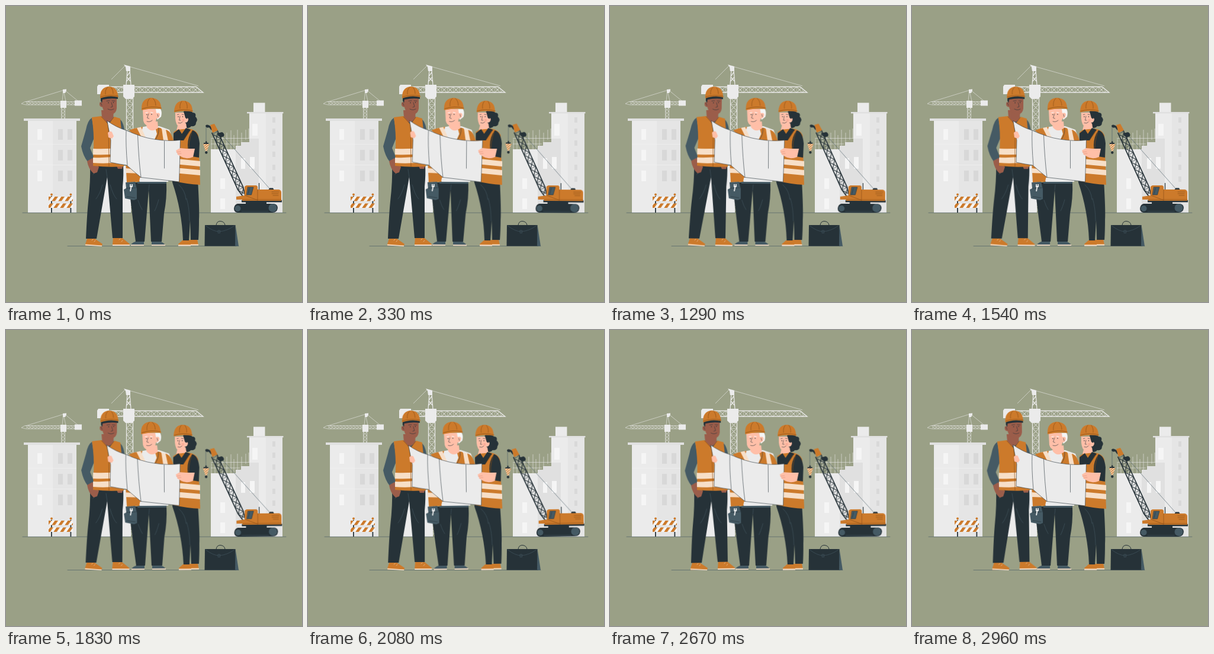
These frames come from a looping animation (500 px wide and 500 px high, 3 s). An HTML page:

```html
<!DOCTYPE html>
<html lang="en">
<head>
<meta charset="utf-8">
<title>Builders on site</title>
<style>
html, body { margin: 0; width: 100%; height: 100%; overflow: hidden; background: #9aa086; }
svg { display: block; width: 100vw; height: 100vh; }
.o { fill: #cc7a2b; } .d { fill: #263238; } .b { fill: #455a64; }
.w { fill: #ebebeb; } .g { fill: #e0e0e0; } .l { fill: #f5f5f5; }
.p { fill: #f7dfc8; } .s { fill: #ffbfa8; } .k { fill: #9b5d4a; }
.ln { fill: none; stroke: #263238; stroke-width: .6; stroke-linecap: round; stroke-linejoin: round; }
.sh { fill: none; stroke: #8a4f18; stroke-width: .7; stroke-linecap: round; }
.wl { fill: none; stroke: #e8e8e6; stroke-width: .6; }
.gl { fill: none; stroke: #455a64; stroke-width: .6; stroke-linecap: round; }

.sway { animation: sway 3s linear infinite; }
.late { animation: late 3s linear infinite; }
.tall { transform-origin: 168px 271px; }
.mid { transform-origin: 236px 280px; }
.lady { transform-origin: 304px 282px; }
.digger { transform-origin: 401px 274px; }
@keyframes sway { 25% { transform: rotate(1deg); } 75% { transform: rotate(-1deg); } }
@keyframes late {
  0%, 16.667% { transform: rotate(0deg); }
  41.667% { transform: rotate(1deg); }
  91.667% { transform: rotate(-1deg); }
  100% { transform: rotate(-.667deg); }
}
</style>
</head>
<body>
<svg viewBox="0 0 500 500" xmlns="http://www.w3.org/2000/svg">
<defs>
  <pattern id="jib" width="10" height="10" x="165" y="136.500" patternUnits="userSpaceOnUse">
    <path d="M0 0L10 10M0 10L10 0M0 0V10" fill="none" stroke="#e8e8e6" stroke-width=".9"/>
  </pattern>
  <pattern id="mast" width="11" height="11" x="203.500" y="155" patternUnits="userSpaceOnUse">
    <path d="M0 0L11 11M0 11L11 0M0 0H11" fill="none" stroke="#e8e8e6" stroke-width="1"/>
  </pattern>
  <pattern id="mini" width="5.500" height="5.500" x="93.500" y="161.500" patternUnits="userSpaceOnUse">
    <path d="M0 0L5.500 5.500M0 5.500L5.500 0M0 0V5.500" fill="none" stroke="#e8e8e6" stroke-width=".6"/>
  </pattern>
  <pattern id="boom" width="13" height="10" y="-5" patternUnits="userSpaceOnUse">
    <path d="M0 0L13 10M0 10L13 0M0 0V10" fill="none" stroke="#263238" stroke-width="1.300"/>
  </pattern>
  <pattern id="tape" width="11" height="8" patternUnits="userSpaceOnUse" patternTransform="skewX(-35)">
    <path class="l" d="M0 0H11V8H0Z"/><path class="o" d="M0 0H5.500V8H0Z"/>
  </pattern>
  <pattern id="cone" width="3" height="3" patternUnits="userSpaceOnUse" patternTransform="rotate(-40)">
    <path class="p" d="M0 0H3V3H0Z"/><path class="o" d="M0 0H3V1.400H0Z"/>
  </pattern>
  <g id="panes"><path d="M0 0h8v18h-8zM0 35h8v18h-8zM0 70h8v18h-8z"/></g>
</defs>
<rect width="500" height="500" fill="#9aa086"/>

<!-- small tower crane -->
<path fill="url(#mini)" d="M93.500 172H99.500V191H93.500ZM34 161.500H118V167H34Z"/>
<path class="wl" d="M93.500 172V191M99.500 172V191M118 161.500H32L26 165L34 167H118M98 142L33 162M99 142L121 160M95 161L97 142L101 161"/>
<path class="w" d="M92 160H102V172H92ZM116 159.500H128V168.500H116ZM96 141L102 140.500V143L100 147H96Z"/>

<!-- left block -->
<path class="w" d="M37 194H119V349H37Z"/>
<path class="g" d="M30 190H125V194H30Z"/>
<path fill="#e5e5e5" d="M79 194H119V349H79Z"/>
<path d="M37 233.500H119M37 268.500H119" stroke="#f1f1f1" stroke-width=".7"/>
<use href="#panes" class="l" x="53" y="208"/>
<use href="#panes" fill="#d8d8d8" x="88" y="208"/>
<use href="#panes" fill="#d8d8d8" x="104" y="208"/>

<!-- large tower crane -->
<path fill="url(#mast)" d="M203.500 155H214.500V349H203.500Z"/>
<path fill="url(#jib)" d="M165 136.500H322L333 146.500H165Z"/>
<path class="wl" style="stroke-width:1.300" d="M203.500 155V349M214.500 155V349M165 136.500H321L333 146H165M203 134L205 108M211 134L209 108M203 128L210 120M211 128L204 120M204 119L209 112"/>
<path class="wl" d="M207 102L325 135M201 101L178 124"/>
<path class="w" d="M198 133H217V153L213 157H202L198 153ZM156 133H174V138L171 149H154V136ZM199 99L210 102V110H203L202 103Z"/>
<path class="w" d="M160 270H211V349H160Z"/>

<!-- right blocks -->
<path class="wl" d="M347 225V243M353 219V243M359 213V243M366 222V243M373 214V243M380 210V243M385 218V243M391 209V237M398 214V231M405 209V226M410 207V224M346 223.500H411M346 233H395"/>
<path class="g" d="M346 242H388V236H397V230H411V224H427V349H346Z"/>
<path class="w" d="M346 242H388V349H346ZM411 180H467V349H427V224H411ZM418 163.500H437.500V181H418Z"/>
<path fill="#e5e5e5" d="M439 181H467V349H439Z"/>
<path class="g" d="M407 179H468.500V181.500H407Z"/>
<path class="l" d="M397 257h7v18h-7zM412 255h8v20h-8zM362 291h8v18h-8zM362 325h8v18h-8zM416 199h9v20h-9z"/>
<path fill="#d9d9d9" d="M450 188h5v9h-5zM450 207h5v9h-5zM450 227h5v9h-5zM450 246h5v9h-5zM450 268h5v9h-5zM450 288h5v9h-5z"/>

<path class="gl" d="M28 349.300H473M104 405.500H393"/>

<!-- barricade -->
<path class="d" d="M76 321h1.800v28h-1.800zM108.500 321h1.800v28h-1.800z"/>
<circle class="o" cx="77" cy="318.500" r="1.900"/><circle class="o" cx="109.400" cy="318.500" r="1.900"/>
<path fill="url(#tape)" d="M72 322H113V329.500H72ZM72 333.500H113V341H72Z"/>

<!-- crawler crane -->
<g class="sway digger">
  <path class="gl" d="M364 217L444 307M338 203V230"/>
  <path d="M427.500 299V311" stroke="#263238" stroke-width="1.200"/>
  <g transform="translate(402 321) rotate(-114.500)">
    <path fill="url(#boom)" d="M4 -4L14 -5H112L120 -3V3L112 5H14L4 4Z"/>
    <path d="M0 -2L14 -5H120M0 2L14 5H120" fill="none" stroke="#263238" stroke-width="1.700"/>
  </g>
  <path class="d" d="M337 202Q339 199 344 202L349 206L347 210L343 205Q338 207 337 202ZM357 215L365 213Q370 216 368 220L363 222L358 219Z"/>
  <path class="o" d="M345 201L352 199L358 210L349 214Z"/>
  <path class="d" d="M334 231H342V233H334ZM337 228.500H339.400V232H337Z"/>
  <path fill="url(#cone)" d="M333 233H343.500L339.500 245H337Z"/>
  <circle class="d" cx="338.300" cy="247.500" r="2.200"/>
  <path class="d" d="M391 334H452Q459 335 459 341Q458 349 450 349H391Q385 348 385 342Q386 335 391 334ZM398 328H466V331.500H440V335H405V331.500H398ZM443 311L445 307.500H451L453 311Z"/>
  <circle class="b" cx="391.500" cy="342" r="5"/><circle class="b" cx="450.500" cy="341" r="7"/>
  <path class="gl" d="M398 347H443"/>
  <path class="o" d="M389 322L403 320V305L406 303H423L425 305V310H461Q465 311 465 315V329H399V327H389Z"/>
  <path class="b" d="M408.500 306H418L414.500 319H406.500Z"/>
  <path class="ln" d="M408.500 306H418L414.500 319H406.500ZM411 308L409 317"/>
  <path class="sh" d="M425 310V328M404 320L425 328M449 314H461M449 317H460M451 320H460M399 327H465"/>
</g>

<!-- briefcase -->
<path class="d" d="M336 370H387.500L389 405.500H335.500Z"/>
<path class="b" d="M387.500 369.500L393 405.500H387Z"/>
<path class="ln" d="M355 370Q356 363.500 362 363.500Q369 364 370 370" style="stroke-width:1"/>
<path class="gl" d="M337 371Q350 381 360 381Q374 380 386 371M358.500 379H361.500V383.500H358.500Z"/>

<!-- woman -->
<g class="sway lady">
  <path class="d" d="M301 176Q312 173 315 180Q322 180 320 187Q325 191 321 197Q321 204 313 203Q309 208 303 205L299 190Z"/>
  <path class="o" d="M291 402L299 395H311V405H291ZM311 396L312 394H323L325 404H311Z"/>
  <path class="p" d="M291 403.300H312V405.400H291ZM312 402.500H325V404.500H312Z"/>
  <path class="d" d="M281 294H324Q327 345 326 361Q326 380 325 395H312L311 362L309 396H299Q297 345 281 298Z"/>
  <path class="gl" d="M305 325Q310 342 310 363M292 302Q303 312 304 327"/>
  <path class="s" d="M291 198H304L306 210L296 220L288 210Z"/>
  <path class="o" d="M283 213L289 209L309 207Q321 209 325 218L328 302Q305 301 281 295Z"/>
  <path class="d" d="M283 215L292 208L297 216L304 206L312 209L300 227H283ZM315 210Q325 212 327 232L326 256L308 253L307 235Q307 221 315 210Z"/>
  <path class="p" d="M288 258L328 262V271L285 267ZM285 273L328 277V286L284 282Z"/>
  <path class="sh" d="M300 227L310 211M309 253Q307 230 314 212"/>
  <path class="s" d="M286 180H303Q306 181 305 190Q308 188 308 192Q307 197 303 197Q300 205 293 204Q287 202 286 190Z"/>
  <path class="d" d="M300 178H307L306 191L303 189Z"/>
  <path class="o" d="M284 178Q285 160 300 160Q314 161 315 176L316 179Q301 176 284 179.500Z"/>
  <path class="sh" d="M285 177.500Q300 173 315 177M294 173Q293 165 297 161M306 173Q307 166 303 161"/>
  <circle class="d" cx="291" cy="187" r=".8"/><circle class="d" cx="298.500" cy="187" r=".8"/>
  <path class="ln" d="M289.500 183.500L292 183M297 183L300 183.500M294 186L292.500 193H295M291 197.500Q295 199.500 298 196"/>
  <circle cx="299.500" cy="193" r="2.200" fill="#f49a88" opacity=".5"/>
</g>

<!-- tall man -->
<g class="late tall">
  <path class="o" d="M134 402L137 393H150L163 402L162 405H134ZM180 402L181 391.500H196L209 402L208 405H180Z"/>
  <path class="p" d="M134 402.500L162 404.500V406L134 404.500ZM180 403H209V405H180Z"/>
  <path class="ln" style="stroke:#f7dfc8" d="M147 394L145 396M151 396L149 398M193 393L191 395M197 396L195 398"/>
  <path class="d" d="M142 268H198Q199 285 197 305L197 392H180L171 289L153 393H135Q137 350 139 330Q143 295 142 268Z"/>
  <path class="gl" d="M171 289L169 276M163 302Q159 317 152 326M176 302Q181 320 187 326M147 285Q151 281 153 277"/>
  <path class="b" d="M145 189Q138 193 135 209L127 237Q130 253 138 263L149 257L142 240L150 220ZM188 190Q197 190 200 209L199 243L190 230Z"/>
  <path class="k" d="M137 262L146 257L151 265L157 272L154 281L148 283Q139 275 137 262ZM186 268L199 266L196 275L189 275Z"/>
  <path class="b" d="M160 187L181 185L184 205H162Z"/>
  <path class="k" d="M161 176H182L181 190Q175 197 169 196L162 188Z"/>
  <path class="o" d="M145 188L161 186L173 200L183 187L193 190Q195 210 196 220L199 271Q174 273 147 270L148 238Q149 215 145 188Z"/>
  <path class="p" d="M147 241Q173 242 198 239V249Q173 252 147 251ZM147 256Q173 257 198 253V263Q173 267 147 265Z"/>
  <path class="sh" d="M173 200L174 271M161 187L173 200L182 188"/>
  <path class="k" d="M160 153H187V173Q186 182 178 183Q165 182 163 171Q157 170 158 164Q159 161 162 163Z"/>
  <path class="d" d="M160 152H189V157Q177 155 163 158L162 164L160 160Z"/>
  <path class="o" d="M159 154Q159 137 174 136Q188 137 189 151L190 154Q174 150 159 156Z"/>
  <path class="sh" d="M160 153.500Q174 149 189 152M168 149Q167 141 172 137M181 148Q181 141 177 137"/>
  <circle class="d" cx="173" cy="163.500" r=".8"/><circle class="d" cx="181.500" cy="163" r=".8"/>
  <path class="ln" d="M170 160.500L175 160M179 160L184 160.500M178 163L180 170L177 171M172 174Q177 177 182 174M160 164L162 168"/>
</g>

<!-- older man -->
<g class="sway mid">
  <path class="b" d="M211 403Q214 399 221 397H233V404H211ZM246 397H259Q267 400 269 404H246Z"/>
  <path class="p" d="M211 403H233V404.700H211ZM246 403H269V404.700H246Z"/>
  <path class="d" d="M210 298H271Q272 325 267 350L263 398H245L241 311L234 398H219Q214 360 210 325Z"/>
  <path class="b" d="M222 296H271V300H222Z"/>
  <path class="gl" d="M241 311L242 302M223 328Q226 338 230 344M258 327Q254 341 251 346"/>
  <path class="w" d="M216 207L238 203H259L276 209L283 228L274 297H226L203 270L206 215Z"/>
  <path class="o" d="M202 262H212L232 283L226 291L225 297L204 298Z"/>
  <path class="p" d="M202 274L224 276L230 283L203 282Z"/>
  <path class="o" d="M216 207L231 204Q227 216 238 225H221L208 210ZM252 205L261 206Q269 211 266 230H249L255 216ZM270 209Q279 211 283 228H268Z"/>
  <path class="p" d="M221 206L228 204.500L236 222H229ZM263 207L270 209L274 228H266Z"/>
  <path class="ln" d="M252 226Q259 217 258 206"/>
  <path class="s" d="M236 195H256L257 206Q246 215 238 205Z"/>
  <path fill="#f5f5f5" d="M251 174H261Q264 179 262 187L256 192L252 186Z"/>
  <path class="s" d="M231 174H253L254 181Q260 179 260 184Q259 190 254 190Q252 203 242 203Q234 202 232 194Z"/>
  <path class="o" d="M229 173Q229 156 245 155Q261 156 262 171L263 174Q247 172 229 176Z"/>
  <path class="sh" d="M230 173.500Q246 168 262 172M239 169Q238 160 243 156M253 168Q253 160 248 156"/>
  <circle class="d" cx="238" cy="183.500" r=".8"/><circle class="d" cx="246" cy="183" r=".8"/>
  <path d="M235.500 180.500L239.500 179.500M244 179.500L248.500 180.500" stroke="#f5f5f5" stroke-width="1.200"/>
  <path class="ln" d="M241 182L238.500 189L241.500 190M238 195Q243 197 247 193M256 183L257 187"/>
  <path class="b" d="M202 298L218 297L221 309V326L216 328L201 325L199 310L203 308Z"/>
  <path class="ln" d="M203 308L219 307M204 322L218 324"/>
  <path d="M210 301V305L213 305V301M211.500 305L210 313" fill="none" stroke="#f0f0f0" stroke-width="1.800"/>
  <!-- plan sheet -->
  <path class="w" d="M171 194Q186 205 203 210Q229 222 250 225Q273 229 294.500 226.500L292.500 297Q260 293 228 289.500Q213 277 204 269Q190 267 176 264L177 227Z"/>
  <path class="ln" d="M171 194Q186 205 203 210Q229 222 250 225Q273 229 294.500 226.500L292.500 297Q260 293 228 289.500Q213 277 204 269Q190 267 176 264L177 227ZM203 210Q202 234 205 269M222.500 218Q224 257 228 289.500M267.500 228V274"/>
  <path class="s" d="M172 214Q176 210 179 213L182 220L179 224L173 222Z"/>
</g>

<!-- hand on the sheet -->
<g class="sway lady">
  <path class="s" d="M287 244L294 240L305 241L319 241L316 255Q304 260 295 254L290 251Z"/>
  <path class="ln" style="stroke:#dc8f7a" d="M288 247L295 246M290 250L296 249"/>
</g>
</svg>
</body>
</html>
```
